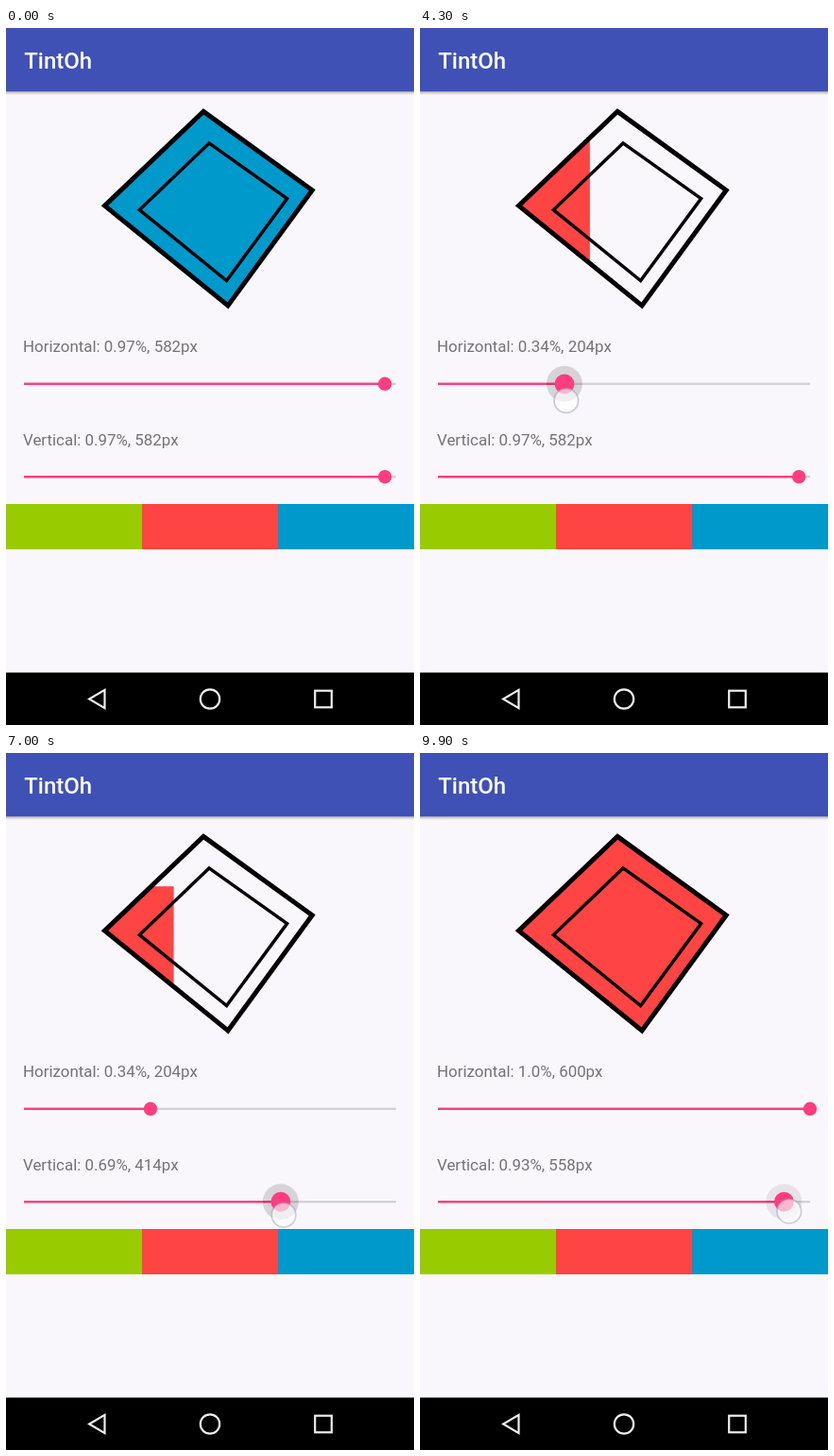
Write an HTML page with a canvas that moves like this. It is 432 px wide and 738 px high and loops after 10 s.

```html
<!DOCTYPE html>
<html lang="en">
<head>
<meta charset="utf-8">
<title>Fill demo</title>
<style>
  html, body { margin: 0; width: 100%; height: 100%; overflow: hidden; background: #f9f7fc; }
  canvas { display: block; width: 432px; height: 738px; }
</style>
</head>
<body>
<canvas id="stage" width="432" height="738"></canvas>
<script>
const ctx = document.getElementById('stage').getContext('2d');
const LOOP = 10000, STEP = 100;
const BG = '#f9f7fc', PINK = '#ff3d7f', TRACK = '#d3d1d6', ICON = '#eee';
const GREEN = '#99cc00', RED = '#ff4444', BLUE = '#0099cc';
const IMAGE = { left: 96, bottom: 307.2, size: 240 };
const SLIDER = { left: 19, width: 394, start: .97 };
const ROW = { Horizontal: 376.8, Vertical: 475.2 };
const HOLD = 200, LEAD = 30;

const OUTER = [[209, 88.4], [324.2, 171.8], [235, 293.9], [104.5, 188.2]];
const INNER = [[215, 121.9], [297.6, 180.6], [233.6, 267.6], [141.4, 192.6]];

const TAPS = [
  { time: 600, x: 78, y: 528, color: GREEN },
  { time: 2000, x: 232, y: 531, color: RED }
];

// Each drag eases through its values in equal legs; dip is the finger's offset below the track
const DRAGS = [
  { name: 'Horizontal', start: 3020, end: 4400, values: [.97, .34], dip: [7, 18] },
  { name: 'Vertical', start: 5050, end: 7150, values: [.97, .38, .71], dip: [10, 14, 14] },
  { name: 'Horizontal', start: 7500, end: 8830, values: [.34, 1], dip: [25, 25] },
  { name: 'Vertical', start: 9400, end: 10060, values: [.71, .97], dip: [10, 10] }
];

const clamp = v => Math.max(0, Math.min(1, v));
const smooth = u => u * u * (3 - 2 * u);
const trackX = v => SLIDER.left + SLIDER.width * v;

function follow(drag, stops, t) {
  const legs = stops.length - 1;
  const pos = legs * clamp((t - drag.start) / (drag.end - drag.start));
  const i = Math.min(legs - 1, Math.floor(pos));
  return stops[i] + (stops[i + 1] - stops[i]) * smooth(pos - i);
}

function valueAt(name, t) {
  const drag = DRAGS.filter(d => d.name === name && d.start <= t).pop();
  return drag ? follow(drag, drag.values, t) : SLIDER.start;
}

function pressAt(name, t) {
  const levels = DRAGS.filter(d => d.name === name).map(d =>
    clamp((t - d.start - HOLD) / 400) * clamp((d.end + HOLD + 300 - t) / 300));
  return Math.max(...levels);
}

function rect(x, y, w, h, color) {
  ctx.fillStyle = color;
  ctx.fillRect(x, y, w, h);
}

function disc(x, y, r, color) {
  ctx.beginPath();
  ctx.arc(x, y, r, 0, Math.PI * 2);
  ctx.fillStyle = color;
  ctx.fill();
}

function poly(points) {
  ctx.beginPath();
  points.forEach(p => ctx.lineTo(...p));
  ctx.closePath();
}

function outline(width, color) {
  ctx.lineWidth = width;
  ctx.strokeStyle = color;
  ctx.stroke();
}

function text(str, x, y, font, color) {
  ctx.font = font + ' Roboto, sans-serif';
  ctx.fillStyle = color;
  ctx.fillText(str, x, y);
}

function drawBars() {
  const shade = ctx.createLinearGradient(0, 67, 0, 71);
  shade.addColorStop(0, 'rgba(0,0,0,.28)');
  shade.addColorStop(1, 'rgba(0,0,0,0)');
  rect(0, 67, 432, 4, shade);
  rect(0, 0, 432, 67.2, '#3f51b5');
  text('TintOh', 19.2, 43, '500 24px', '#fff');

  [GREEN, RED, BLUE].forEach((c, i) => rect(i * 144, 504, 144, 48, c));

  rect(0, 682.5, 432, 56, '#000');
  poly([[88.2, 710.5], [104.5, 700.9], [104.5, 720.1]]);
  outline(2.2, ICON);
  ctx.beginPath();
  ctx.arc(216, 710.5, 10.2, 0, Math.PI * 2);
  outline(2.2, ICON);
  ctx.strokeRect(327.2, 701.7, 17.6, 17.6);
}

function drawShape(t) {
  const { left, bottom, size } = IMAGE;
  const w = size * valueAt('Horizontal', t), h = size * valueAt('Vertical', t);
  const tap = TAPS.filter(p => t >= p.time + 150).pop();
  ctx.save();
  poly(OUTER);
  ctx.clip();
  rect(left, bottom - h, w, h, tap ? tap.color : BLUE);
  ctx.restore();
  poly(OUTER);
  outline(5, '#000');
  poly(INNER);
  outline(3.5, '#000');
}

function drawSlider(name, t) {
  const y = ROW[name], press = pressAt(name, t);
  const pct = Math.floor(valueAt(name, t) * 100 + 1e-6);
  const share = pct % 100 ? pct / 100 : (pct / 100).toFixed(1);
  const x = trackX(pct / 100);
  text(`${name}: ${share}%, ${pct * 6}px`, 18, y - 33.5, '16.9px', '#747277');
  rect(SLIDER.left, y - 1.2, SLIDER.width, 2.4, TRACK);
  rect(SLIDER.left, y - 1.2, x - SLIDER.left, 2.4, PINK);
  if (press) disc(x, y, 19, `rgba(0,0,0,${.14 * press * press})`);
  disc(x, y, 7.2 + 3.2 * clamp(press * 3), PINK);
}

function drawFinger(t) {
  const tap = TAPS.find(p => t >= p.time && t < p.time + 250);
  const drag = DRAGS.find(d => t >= d.start && t < d.end + HOLD);
  if (!tap && !drag) return;
  const x = tap ? tap.x : trackX(follow(drag, drag.values, t + LEAD));
  const y = tap ? tap.y : ROW[drag.name] + follow(drag, drag.dip, t);
  disc(x, y, 12.8, 'rgba(255,255,255,.62)');
  outline(1.7, 'rgba(160,150,195,.5)');
}

function draw(t) {
  rect(0, 0, 432, 738, BG);
  drawBars();
  drawShape(t);
  drawSlider('Horizontal', t);
  drawSlider('Vertical', t);
  drawFinger(t);
}

const start = performance.now();
function tick() {
  const t = (performance.now() - start + 5) % LOOP;
  draw(Math.floor(t / STEP) * STEP);
  requestAnimationFrame(tick);
}
tick();
</script>
</body>
</html>
```
